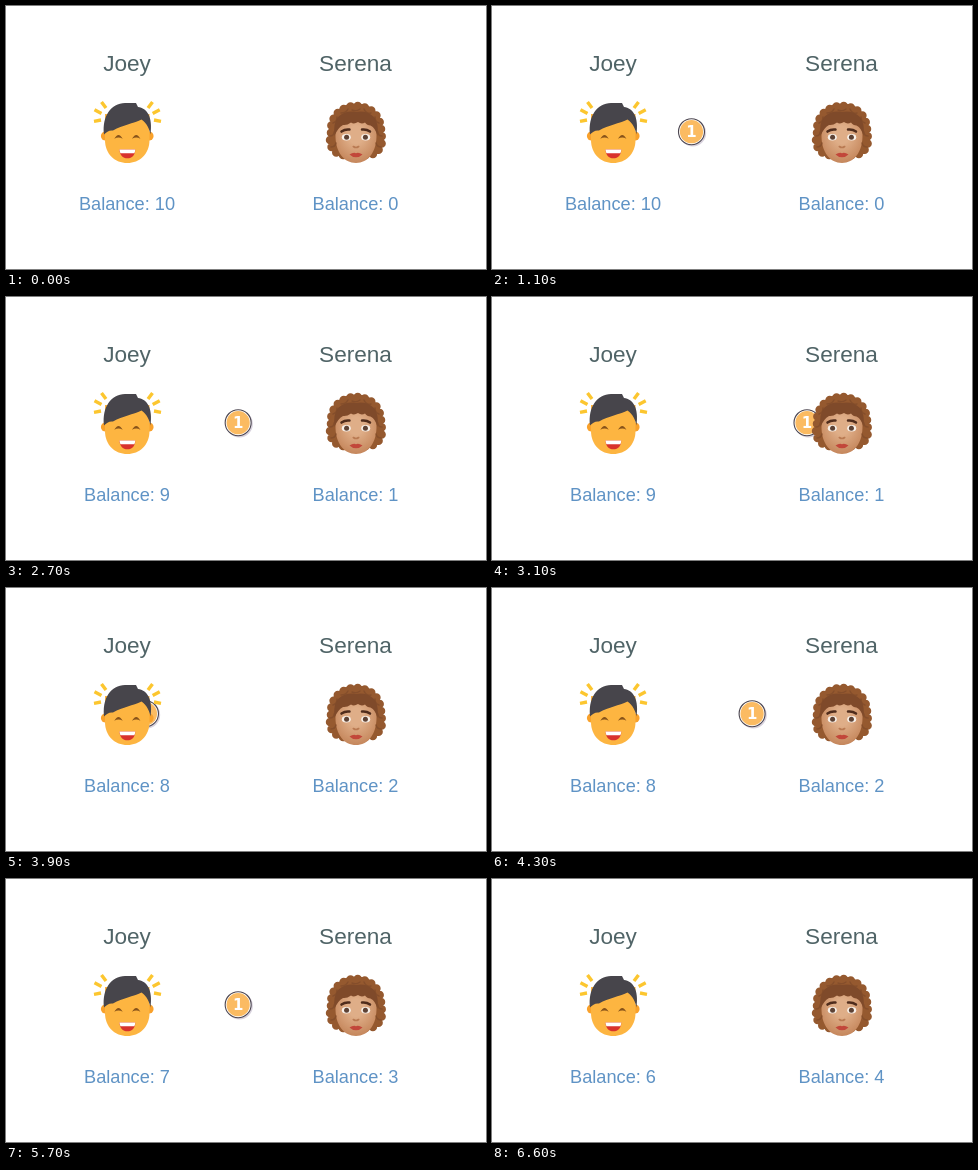
Recreate the animation shown at these times as an HTML page. Size 480 by 263 pixels, loop 8000 ms.

```html
<!DOCTYPE html>
<html lang="en">
<head>
<meta charset="utf-8">
<title>Balance transfer</title>
<style>
  html, body { margin: 0; width: 100%; height: 100%; overflow: hidden; background: #fff; }
  svg { display: block; width: 100%; height: 100%; }
  text { font-family: "Liberation Sans", Arial, sans-serif; text-anchor: middle; }
  .name { font-size: 22.6px; fill: #506467; }
  .balance { font-size: 18.2px; fill: #5f93c5; }
  .digit { font: bold 15px "DejaVu Sans", Verdana, sans-serif; fill: #fff; }
  .line { fill: none; stroke-linecap: round; }
  .rays { fill: none; stroke: #fcc62f; stroke-width: 3.4; }
</style>
</head>
<body>
<svg viewBox="0 0 480 263">
  <defs>
    <radialGradient id="skin" cx=".5" cy=".4" r=".62">
      <stop offset=".3" stop-color="#dfae88"/>
      <stop offset="1" stop-color="#c4855a"/>
    </radialGradient>
  </defs>

  <text class="name" x="121" y="65">Joey</text>
  <text class="name" x="349.5" y="65">Serena</text>

  <g id="coin" visibility="hidden">
    <circle cx="1.3" cy="1.3" r="13.4" fill="#d9d3de"/>
    <circle r="13" fill="#fff" stroke="#4c4650" stroke-width="1.1"/>
    <circle r="11.6" fill="#fbbb62"/>
    <text class="digit" y="5.4">1</text>
  </g>

  <g id="laughing">
    <path class="rays" d="M95.5 96l4.500 6M88.500 103.800l7 3.600M88 115.300l7-1.300M146.500 96l-4.500 6M153.700 103.800l-7 3.600M155 115.300l-7-1.300"/>
    <circle cx="99.500" cy="130" r="4.600" fill="#f9a12b"/>
    <circle cx="143" cy="130" r="4.600" fill="#f9a12b"/>
    <path fill="#fdb541" d="M99 108H143.500V134C143.500 148 133.500 157 121.200 157S99 148 99 134Z"/>
    <path fill="#47454b" d="M98 128.500C96 110 105 97.500 119 97H130L132 101C141 102 147 111 144.500 128.500C143.500 123 141 117.500 135.500 113.500C127 117.500 117 119 107 124.500C103 124 100.500 126 98 128.500Z"/>
    <path fill="#87531a" d="M108.300 132.800q4.200-7.600 8.400 0q-4.200-2.600-8.400 0zM126 132.800q4.200-7.600 8.400 0q-4.200-2.600-8.400 0z"/>
    <path fill="#d8322c" d="M113.500 143.500h15.800c0 5.300-3.200 8.800-7.900 8.800s-7.900-3.500-7.900-8.800z"/>
    <path fill="#fff" d="M113.500 143.500h15.800q-.2 2.200-1 3.800h-13.800q-.8-1.600-1-3.800z"/>
  </g>

  <g id="curly">
    <path class="line" fill="#95592f" stroke="#95592f" stroke-width="8.500" stroke-dasharray="0 7.200" style="fill:#95592f"
      d="M337 149C326 147 322 138 325 127C324 110 335 100.500 350 100C365 100.500 376 110 375 127C378 138 374 147 363 149Z"/>
    <path fill="#95592f" d="M350 97.500C368 97.500 376.500 111 376 127C378.500 139 374 149.500 364 150.500H336C326 149.500 321.500 139 324 127C323.500 111 332 97.500 350 97.500Z"/>
    <path fill="url(#skin)" d="M329.500 128C329.500 116 338 110 350 110S370.500 116 370.500 128C371 146 362 157 350 157S329 146 329.500 128Z"/>
    <path fill="#7f4a2a" d="M328.500 130Q327 117 332 111Q340 104 350 106Q360 104 368 111Q373 117 371.500 130Q369.500 122 364.500 119.500Q361 119.500 359 116.500Q355.500 118.500 352 116Q348 118.500 345 116.500Q341 119.500 337 119Q331.500 122 328.500 130Z"/>
    <path class="line" stroke="#7f4a2a" stroke-width="1.500" opacity=".7"
      d="M327 117q4-1 4-6M335 107q5 0 7-4M346 104q4 2 8-1M358 103q2 5 7 4M369 111q0 5 4 6M324 130q4 0 4-4M376 130q-4 0-4-4M325 141q4 0 5-4M375 141q-4 0-5-4"/>
    <path class="line" stroke="#4f2c1c" stroke-width="2.500" d="M335.500 125.600q3.500-2.600 8-2M356 123.600q4.500-.6 8 2"/>
    <g fill="#f8f1ea">
      <ellipse cx="340.300" cy="131.300" rx="4.500" ry="3.300"/>
      <ellipse cx="359.700" cy="131.300" rx="4.500" ry="3.300"/>
    </g>
    <g fill="#5d4235">
      <circle cx="340.600" cy="131.300" r="2.500"/>
      <circle cx="359.400" cy="131.300" r="2.500"/>
    </g>
    <path class="line" stroke="#b97a52" stroke-width="1.600" d="M347.300 140.500q2.700 2 5.400 0"/>
    <path fill="#c2473a" d="M343.500 148.400q4-2.400 6.500-1.200q2.500-1.200 6.500 1.200q-3 2.900-6.500 2.900t-6.500-2.900z"/>
  </g>

  <text class="balance" id="giver" x="121" y="204">Balance: 10</text>
  <text class="balance" id="taker" x="349.5" y="204">Balance: 0</text>
</svg>
<script>
  const LOOP = 8000, TICK = 100, TRIPS = 4;
  const FIRST = 900, PERIOD = 1500, VISIBLE = 900;   // coin trips
  const PAID = [2200, 3600, 5100, 6600];             // balance updates
  const LEAD = 139, TRAVEL = 1540, FROM = 121, TO = 351;

  const $ = id => document.getElementById(id);
  const coin = $("coin"), giver = $("giver"), taker = $("taker");

  // cubic-bezier(.25, .1, .25, 1)
  function ease(u) {
    let lo = 0, hi = 1, p = 0.5;
    for (let i = 0; i < 24; i++) {
      p = (lo + hi) / 2;
      if (0.75 * p * (1 - p) + p ** 3 < u) lo = p; else hi = p;
    }
    return 0.3 * p * (1 - p) ** 2 + 3 * p * p * (1 - p) + p ** 3;
  }

  function draw(t) {
    const trip = Math.floor((t - FIRST) / PERIOD);
    const age = t - FIRST - trip * PERIOD;
    const shown = trip >= 0 && trip < TRIPS && age < VISIBLE;
    coin.setAttribute("visibility", shown ? "visible" : "hidden");
    if (shown) {
      const x = FROM + (TO - FROM) * ease((age + LEAD) / TRAVEL);
      coin.setAttribute("transform", `translate(${x.toFixed(2)} 125.7)`);
    }
    const paid = PAID.filter(at => t >= at).length;
    giver.textContent = `Balance: ${10 - paid}`;
    taker.textContent = `Balance: ${paid}`;
  }

  const start = performance.now();
  function frame() {
    const t = (performance.now() - start) % LOOP;
    draw(Math.floor(t / TICK) * TICK);
    requestAnimationFrame(frame);
  }
  frame();
</script>
</body>
</html>
```
